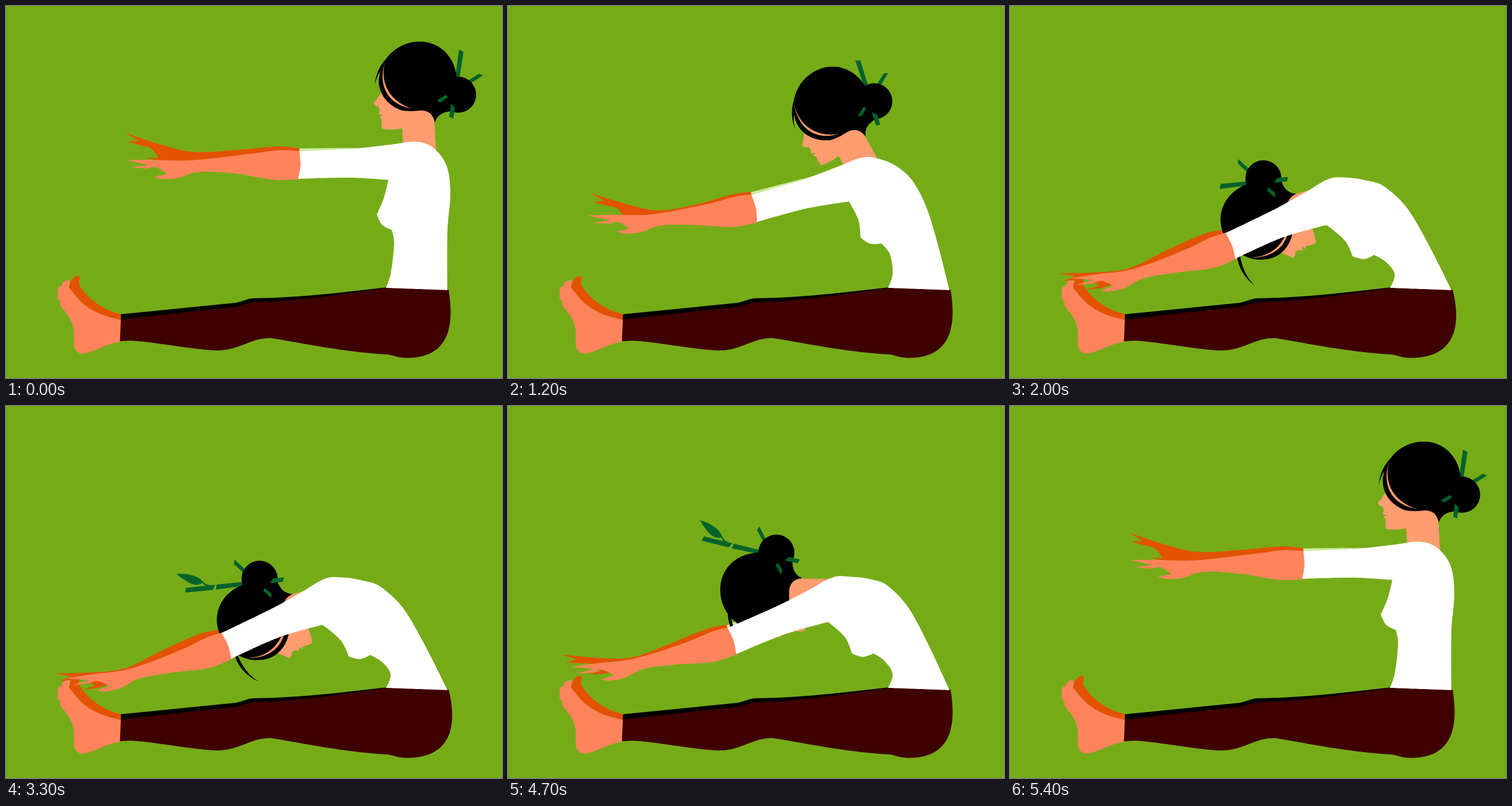
Recreate the animation shown at these times as an HTML page with a canvas. Size 864 by 648 pixels, loop 6400 ms.

```html
<!DOCTYPE html>
<html lang="en">
<head>
<meta charset="utf-8">
<title>Seated forward bend</title>
<style>
html, body { margin: 0; overflow: hidden; background: #76ab18; }
canvas { display: block; }
</style>
</head>
<body>
<canvas width="864" height="648"></canvas>
<script>
const ctx = document.querySelector('canvas').getContext('2d');
const SKIN = '#ff845c', SHADE = '#e35205', FACE = '#ff9c70', STICK = '#00632a';

// Each bone's joint and turn in degrees: sitting, leaning, bending, reaching.
const bendSteps = [0, 3, 7, 11.5];
const bones = {
  chest: [[646, 363, 0], [614, 403, -30], [599, 431, -46], [597, 436, -49.5]],
  sleeve: [[511, 277, 0], [430, 352.5, -14], [391, 409, -21], [385, 417.5, -23]],
  elbow: [[511, 277, 0], [430, 352.5, -5.7], [391, 409, -12.7], [385, 417.5, -14]],
  hand: [[320, 269, 0], [250, 363, -1.5], [220, 440, -8], [215, 458, -9]],
  backHand: [[325, 254, 0], [262, 356, -1.6], [215, 438, -13.5], [207, 457, -20]],
  head: [[787.5, 154.5, 0], [638, 166, -26], [467.5, 255.5, -85.4], [441.7, 301, -105]]
};
const swaySteps = [12, 20, 26, 43, 51, 54];
const swayKeys = [[0], [46], [33], [35], [13], [0]];

// Outlines in the sitting pose; a star marks a sharp corner.
const parse = text => text.split(' ').map(item => {
  const [x, y] = item.split(',').map(parseFloat);
  return { x, y, sharp: item.endsWith('*') };
});
const torso = parse('511,253* 610,248 670,241.5 716,236.5 744,247 767,277 774,325 769,390 769,495* 662,491* ' +
  '670,467 676,412 672,390* 655,381 646,363* 658,335 666,303* 600,299 509,301* 513,277');
const backSleeve = parse('511,248* 615,247* 511,256*');
const backArm = parse('513,248* 475,244.5 400,251 325,254 265,240 206,220* 232,235* 211,236* 235,243 252,248 ' +
  '266,265* 244,264* 270,270 320,270 513,258*');
const arm = parse('516,253* 478,251 430,257 320,269 250,268 209,268* 248,277* 218,281* 245,283 262,281 ' +
  '281,293* 258,297* 270,301 298,300 335,289 400,292 470,303 516,301*');

const clamp = (v, lo = 0, hi = 1) => Math.min(hi, Math.max(lo, v));

// Cubic Hermite interpolation through keyed rows of numbers, at rest at both ends.
function track(times, rows, time) {
  const last = times.length - 1;
  const t = clamp(time, times[0], times[last]);
  let i = 0;
  while (i < last - 1 && t > times[i + 1]) i++;
  const span = times[i + 1] - times[i], u = (t - times[i]) / span;
  const slope = (k, c) => k === 0 || k === last ? 0 :
    (rows[k + 1][c] - rows[k - 1][c]) / (times[k + 1] - times[k - 1]);
  const blend = u * u * (3 - 2 * u);
  return rows[i].map((a, c) => a + (rows[i + 1][c] - a) * blend +
    span * u * (1 - u) * ((1 - u) * slope(i, c) - u * slope(i + 1, c)));
}

function fill(color, path) {
  ctx.fillStyle = color;
  ctx.fill(new Path2D(path));
}

function around(x, y, degrees, scale, draw) {
  ctx.save();
  ctx.translate(x, y);
  ctx.rotate(degrees * Math.PI / 180);
  ctx.scale(scale, scale);
  ctx.translate(-x, -y);
  draw();
  ctx.restore();
}

// Closed curve through the points, smooth except at sharp ones.
function outline(color, points) {
  const n = points.length;
  const at = i => points[(i + n) % n];
  const handle = (i, reach) => {
    const p = at(i), before = at(i - 1), after = at(i + 1);
    if (p.sharp) return [p.x, p.y];
    const dx = after.x - before.x, dy = after.y - before.y;
    const scale = reach / Math.hypot(dx, dy);
    return [p.x + dx * scale, p.y + dy * scale];
  };
  ctx.beginPath();
  ctx.moveTo(at(0).x, at(0).y);
  for (let i = 0; i < n; i++) {
    const a = at(i), b = at(i + 1);
    const reach = Math.hypot(b.x - a.x, b.y - a.y) / 3;
    ctx.bezierCurveTo(...handle(i, reach), ...handle(i + 1, -reach), b.x, b.y);
  }
  ctx.fillStyle = color;
  ctx.fill();
}

// Moves a point with a bone.
function follow(name, p, bend) {
  const [restX, restY] = bones[name][0];
  const [x, y, degrees] = track(bendSteps, bones[name], bend);
  const angle = degrees * Math.PI / 180, cos = Math.cos(angle), sin = Math.sin(angle);
  const dx = p.x - restX, dy = p.y - restY;
  return { x: x + dx * cos - dy * sin, y: y + dx * sin + dy * cos, sharp: p.sharp };
}

function mix(a, b, w) {
  return { x: a.x + (b.x - a.x) * w, y: a.y + (b.y - a.y) * w, sharp: a.sharp };
}

// The hips stay put; the chest gives way to the sleeve across a slanted seam.
function bendTorso(p, bend) {
  if (p.y > 440) return p;
  const seam = clamp((490 - p.y - 0.257 * p.x) / 32);
  return mix(follow('chest', p, bend), follow('sleeve', p, bend), seam);
}

// The forearm blends from wrist to elbow.
function bendArm(hand, p, bend) {
  const wrist = bones[hand][0][0], elbow = bones.elbow[0][0];
  return mix(follow(hand, p, bend), follow('elbow', p, bend), clamp((p.x - wrist) / (elbow - wrist)));
}

function drawLegs(lean) {
  fill(SHADE, 'M110 490C112 476 120 468 128 471C130 477 124 481 130 490C145 512 170 530 201 537V560C160 560 125 525 105 500Z');
  fill(SKIN, `M201 547L199 585C175 588 155 602 138 605C122 608 117 595 118 580C120 555 112 545 103 532
    C96 525 93 520 95 514C89 512 88 502 91 499C88 492 92 488 97 488C97 480 106 476 111 478
    C113 483 109 487 110 491C134 522 150 536 201 547Z`);
  fill('#000', 'M200 537L400 517C415 514 420 509 435 509C520 508 600 497 665 490V500L200 550Z');
  fill('#3f0000', `M200 546L400 524C415 521 420 516 440 516C530 512 600 500 662 491L771 494
    C${779 + 5 * lean} 545 ${780 + 4 * lean} 613 698 613C685 613 675 609 665 607C590 603 520 588 465 579
    C430 575 405 602 365 600C320 598 240 582 215 583L198.500 584Z`);
}

function drawSprig(step) {
  if (step < 24 || step >= 54) return;
  ctx.globalAlpha = clamp((54 - step) / 5);
  around(794, 74, 0, clamp((step - 23) / 5), () => fill(STICK, 'M790 71L797.500 77L805.500 26.500L798 23Z'));
  around(798, 67, 0, clamp((step - 27) / 6), () =>
    fill(STICK, 'M797 67Q800 59 806 57C802 42 812 33 833 17C830 36 819 54 808 58Q802 61 799 69Z'));
  ctx.globalAlpha = 1;
}

function drawHead(bend, step) {
  const [restX, restY] = bones.head[0];
  const [x, y, turn] = track(bendSteps, bones.head, bend);
  const [sway] = track(swaySteps, swayKeys, step);
  ctx.save();
  ctx.translate(x - restX, y - restY);
  around(restX, restY, turn, 1, () => {
    fill(FACE, `M654 150Q649 160 641 168Q640 173 650 176L651 182Q650 186 649 188L656 190L650 193Q656 197 654 202
      Q654 212 656 214Q670 217 690 213L693 262L750 268L745 180L700 120Z`);
    around(680, 78, sway, 1, () => fill('#000', 'M680 78Q646 98 642 138Q649 106 682 82Z'));
    fill(STICK, 'M789 76L797 80L789 130L782 130ZM831 121L824 118L798 134L804 138Z');
    fill('#000', `M659 97C672 75 695 62 721 62C757 62 782 90 785 124L795 185C765 180 752 188 747 203
      C744 190 738 182 722 182C710 183 705 184 690 182C660 172 644 145 651 118C652 110 655 103 659 97Z`);
    fill('#000', 'M756 154.500a31.500 31.500 0 1 0 63 0a31.500 31.500 0 1 0 -63 0Z');
    fill(FACE, 'M660 97C650 130 657 170 708 179C672 168 650 138 660 97Z');
    fill(STICK, 'M750 165L766 155L770 159L757 168ZM775 170L782 177L779 196L772 193Z');
    drawSprig(step);
  });
  ctx.restore();
}

let start;
function frame(now) {
  start ??= now;
  const step = Math.floor((now - start) % 6400 / 100);
  const bend = clamp(Math.min(step - 9, 54 - step), 0, 11.5);

  fill('#76ab18', 'M0 0H864V648H0Z');
  outline(SHADE, backArm.map(p => bendArm('backHand', p, bend)));
  outline('#cdec9c', backSleeve.map(p => follow('sleeve', p, bend)));
  drawLegs(clamp((bend - 7) / 4));
  drawHead(bend, step);
  outline(SKIN, arm.map(p => bendArm('hand', p, bend)));
  outline('#fff', torso.map(p => bendTorso(p, bend)));
  requestAnimationFrame(frame);
}
requestAnimationFrame(frame);
</script>
</body>
</html>
```
